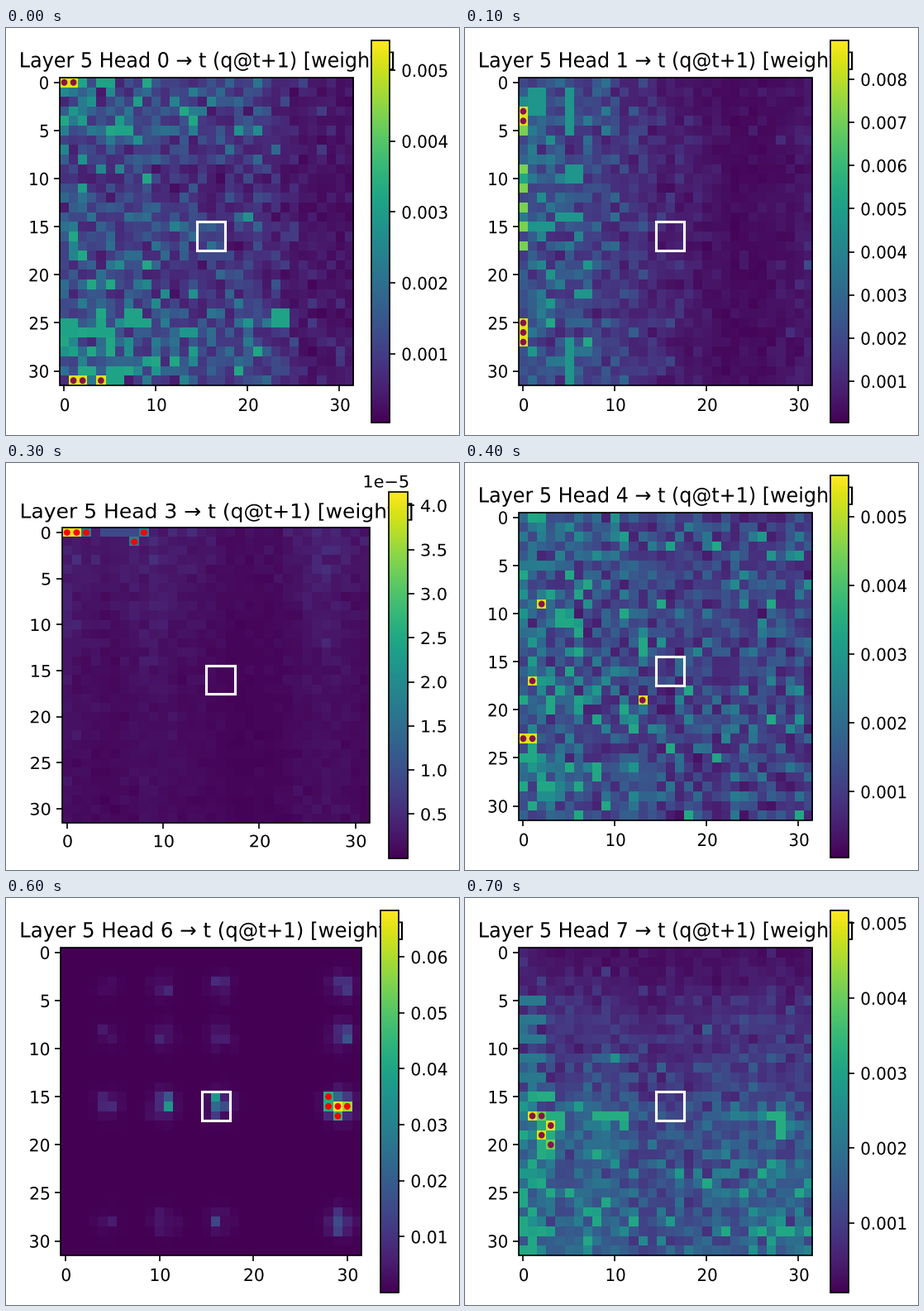
These frames come from a looping animation (548x492 px, 0.8 s). A matplotlib script:

```python
import numpy as np
import matplotlib.pyplot as plt
from matplotlib.animation import FuncAnimation
from matplotlib.patches import Ellipse, PathPatch, Rectangle
from matplotlib.textpath import TextPath
from matplotlib.transforms import Affine2D

STAGE_W, STAGE_H, DPI = 548, 492, 128
N, SIDE = 32, 372
CELL = SIDE / N
LEFT, TOP = 68, 60
BAR_X, BAR_Y, BAR_W, BAR_H = 463.25, 15, 23.1, 462
TICK, LABEL_SIZE, TITLE_SIZE = 7.3, 20.83, 25
LINE = 1.67 * 72 / DPI
RED, MAROON = "#ff0000", "#861546"


def profile(levels):
    return np.interp(np.arange(N), np.linspace(0, N - 1, len(levels)), levels)


def weights(seed, grain, across, down, peaks, patches=(), glow=.58, top=.95):
    """Grainy product of two profiles, with glowing patches and peak cells."""
    rng = np.random.default_rng(seed)
    field = np.outer(profile(down), profile(across))
    field = (field * rng.lognormal(0, grain, field.shape)).clip(0, .6)
    for col, row, w, h in patches:
        field[row:row + h, col:col + w] = glow
    for col, row in peaks:
        field[row, col] = top
    return field, peaks


def speckled():
    return weights(3, .5, [.28, .26, .22, .18, .17, .07, .05],
                   [1.1, 1, .6, .9, .8, 1.3, 1.2],
                   [(0, 0), (1, 0), (1, 31), (2, 31), (4, 31)],
                   [(2, 0, 1, 1), (4, 0, 2, 1), (6, 5, 2, 1), (7, 24, 2, 2),
                    (23, 24, 2, 2), (0, 25, 2, 2), (3, 26, 3, 1), (5, 30, 2, 2)])


def left_stripes():
    field, peaks = weights(5, .38, [.29, .22, .2, .12, .07, .03, .03, .07], [1, 1],
                           [(0, 3), (0, 4), (0, 25), (0, 26), (0, 27)],
                           [(1, 1, 2, 3), (5, 1, 1, 5), (5, 9, 2, 2), (4, 14, 3, 1),
                            (1, 15, 3, 1), (6, 22, 2, 1), (5, 27, 1, 5)], .52)
    field[9:18:2, 0] = field[13, 0] = field[5, 0] = .8
    return field, peaks


def mixed():
    return weights(7, .45, [.3, .25, .17, .12, .08], [1.1, .8, .9, 1.2],
                   [(0, 0), (1, 0), (0, 13), (0, 14), (1, 25)])


def corner():
    field, peaks = weights(9, .25, [.045, .025, .045, .03, .013, .018, .048, .025],
                           [2.2, 1.5, 1, .9, .8],
                           [(2, 0), (8, 0), (7, 1)],
                           [(4, 0, 4, 1)], .22, .42)
    field[0, :2] = .96
    return field, peaks + [(0, 0), (1, 0)]


def patchy():
    return weights(11, .5, [.34, .25, .2, .2, .18], [1, 1],
                   [(2, 9), (1, 17), (13, 19), (0, 23), (1, 23)])


def busy():
    field, peaks = weights(13, .5, [.4, .23, .27, .17, .2, .22, .2],
                           [.7, 1, 1.1, 1.1, 1],
                           [(1, 11), (2, 11), (13, 11), (1, 17), (2, 19)],
                           [(0, 5, 2, 1), (14, 8, 5, 1), (19, 10, 1, 4),
                            (25, 11, 4, 1), (18, 17, 5, 1), (20, 18, 1, 6),
                            (23, 24, 3, 1)])
    bright = [(11, 5, 2), (0, 7, 3), (0, 11, 1), (9, 11, 2), (22, 11, 2),
              (0, 13, 2), (9, 18, 2), (9, 23, 2), (14, 23, 1), (9, 30, 2)]
    for col, row, w in bright:
        field[row, col:col + w] = .8
    return field, peaks


def hotspot():
    """Bumps along each axis, multiplied into a lattice of faint spots."""
    def bumps(centers, heights):
        axis = np.arange(N)
        return sum(h * np.exp(-(axis - c) ** 2 / 1.3)
                   for c, h in zip(centers, heights))

    noise = np.random.default_rng(15).lognormal(0, .5, (N, N))
    across = bumps([4.5, 10.5, 16.5, 29.3], [.12, .3, .33, .9])
    down = bumps([3.6, 8.7, 15.9, 28], [.2, .25, .8, .28])
    field = (np.outer(down, across) * noise + .003).clip(0, .34)
    peaks = [(28, 15), (28, 16), (29, 17), (30, 16), (29, 16)]
    for (col, row), level in zip(peaks, [.62, .62, .65, .85, 1]):
        field[row, col] = level
    field[15, 16] = field[16, 11] = .53
    return field, peaks


def lower_half():
    field, peaks = weights(17, .33, [.35, .26, .26, .18, .19, .22, .27, .22],
                           [.2, .3, .65, .65, .8, 1.3, 1.2, 1.25, 1.3, 1.3],
                           [(1, 17), (2, 17), (3, 18), (2, 19), (3, 20)],
                           [(2, 15, 2, 1), (3, 17, 2, 1), (2, 18, 1, 1),
                            (4, 18, 1, 1), (3, 19, 1, 1), (2, 20, 1, 2),
                            (8, 17, 4, 1), (27, 17, 2, 1), (28, 18, 1, 2)], .62)
    field[17, 2] = field[20, 3] = .78
    field[5:15:2, :3] = .4
    return field, peaks


# field and peaks, low, high, tick step, label format, exponent, dot colour
HEADS = [
    (speckled(), .00003, .00542, .001, "%.3f", "", MAROON),
    (left_stripes(), .00004, .0089, .001, "%.3f", "", MAROON),
    (mixed(), .00003, .0062, .001, "%.3f", "", MAROON),
    (corner(), 0, 4.15, .5, "%.1f", "1e\u22125", RED),
    (patchy(), .00004, .0056, .001, "%.3f", "", MAROON),
    (busy(), .00008, .00389, .0005, "%.4f", "", MAROON),
    (hotspot(), 0, .0683, .01, "%.2f", "", RED),
    (lower_half(), .00007, .00517, .001, "%.3f", "", MAROON),
]

fig = plt.figure(figsize=(STAGE_W / DPI, STAGE_H / DPI), dpi=DPI, facecolor="white")
ax = fig.add_axes([0, 0, 1, 1])


def text(x, baseline, string, size=LABEL_SIZE, align=0.0):
    """Write text; align 0, 0.5 or 1 puts its left, middle or right at x."""
    path = TextPath((0, 0), string, size=size, prop={"family": "DejaVu Sans"})
    width = path.get_extents().x1
    place = Affine2D().scale(1, -1).translate(x - align * width, baseline)
    ax.add_patch(PathPatch(place.transform_path(path), fc="black", lw=0, zorder=3))
    return width


def line(xs, ys):
    ax.plot(xs, ys, color="black", lw=LINE, solid_capstyle="butt", zorder=4)


def frame_box(x, y, w, h, color="black", width=LINE, z=5):
    ax.add_patch(Rectangle((x, y), w, h, fill=False, ec=color, lw=width, zorder=z))


def picture(values, x, y, w, h, z):
    ax.imshow(values, cmap="viridis", vmin=0, vmax=1, interpolation="nearest",
              extent=(x, x + w, y + h, y), aspect="auto", zorder=z)


def draw_map(field, peaks, top, dot_color):
    picture(field, LEFT, top, SIDE, SIDE, 1)
    frame_box(LEFT, top, SIDE, SIDE, z=2)
    frame_box(LEFT + 15 * CELL, top + 15 * CELL, 3 * CELL, 3 * CELL,
              "white", 3.1 * 72 / DPI)
    for col, row in peaks:
        center = LEFT + (col + .5) * CELL, top + (row + .5) * CELL
        ax.add_patch(Ellipse(center, 8, 8, fc=dot_color, lw=0, zorder=6))
    bottom = top + SIDE
    for value in range(0, N, 10):
        x = LEFT + (value + .5) * CELL
        line([x, x], [bottom, bottom + TICK])
        text(x, bottom + 31, str(value), align=.5)
    for value in range(0, N, 5):
        y = top + (value + .5) * CELL
        line([LEFT - TICK, LEFT], [y, y])
        text(LEFT - 2 * TICK, y + 8, str(value), align=1)


def draw_bar(top, low, high, step, label, exponent):
    """Draw the colour bar and return the right edge of its labels."""
    right = BAR_X + BAR_W
    picture(np.linspace(1, 0, 256)[:, None], BAR_X, top, BAR_W, BAR_H, 4)
    frame_box(BAR_X, top, BAR_W, BAR_H)
    widest = 0
    for k in range(1, int(high / step) + 1):
        y = top + BAR_H * (high - k * step) / (high - low)
        line([right, right + TICK], [y, y])
        widest = max(widest, text(right + 2 * TICK, y + 8, label % (k * step)))
    if exponent:
        text(right, top - 6.25, exponent, align=1)
    return right + 2 * TICK + widest


def update(head):
    (field, peaks), low, high, step, label, exponent, dot_color = HEADS[head]
    shift = 22 if exponent else 0
    ax.clear()
    ax.set_axis_off()
    text(LEFT + SIDE / 2, TOP + shift - 12.5,
         f"Layer 5 Head {head} \u2192 t (q@t+1) [weights]", TITLE_SIZE, .5)
    draw_map(field, peaks, TOP + shift, dot_color)
    edge = draw_bar(BAR_Y + shift, low, high, step, label, exponent)
    # Each plot is fitted whole to the stage, whatever its label widths.
    ax.set_xlim(0, round(edge + 15))
    ax.set_ylim(STAGE_H + shift, 0)
    return []


anim = FuncAnimation(fig, update, frames=len(HEADS), init_func=lambda: [],
                     interval=100, repeat=True, repeat_delay=0)
plt.show()
```
